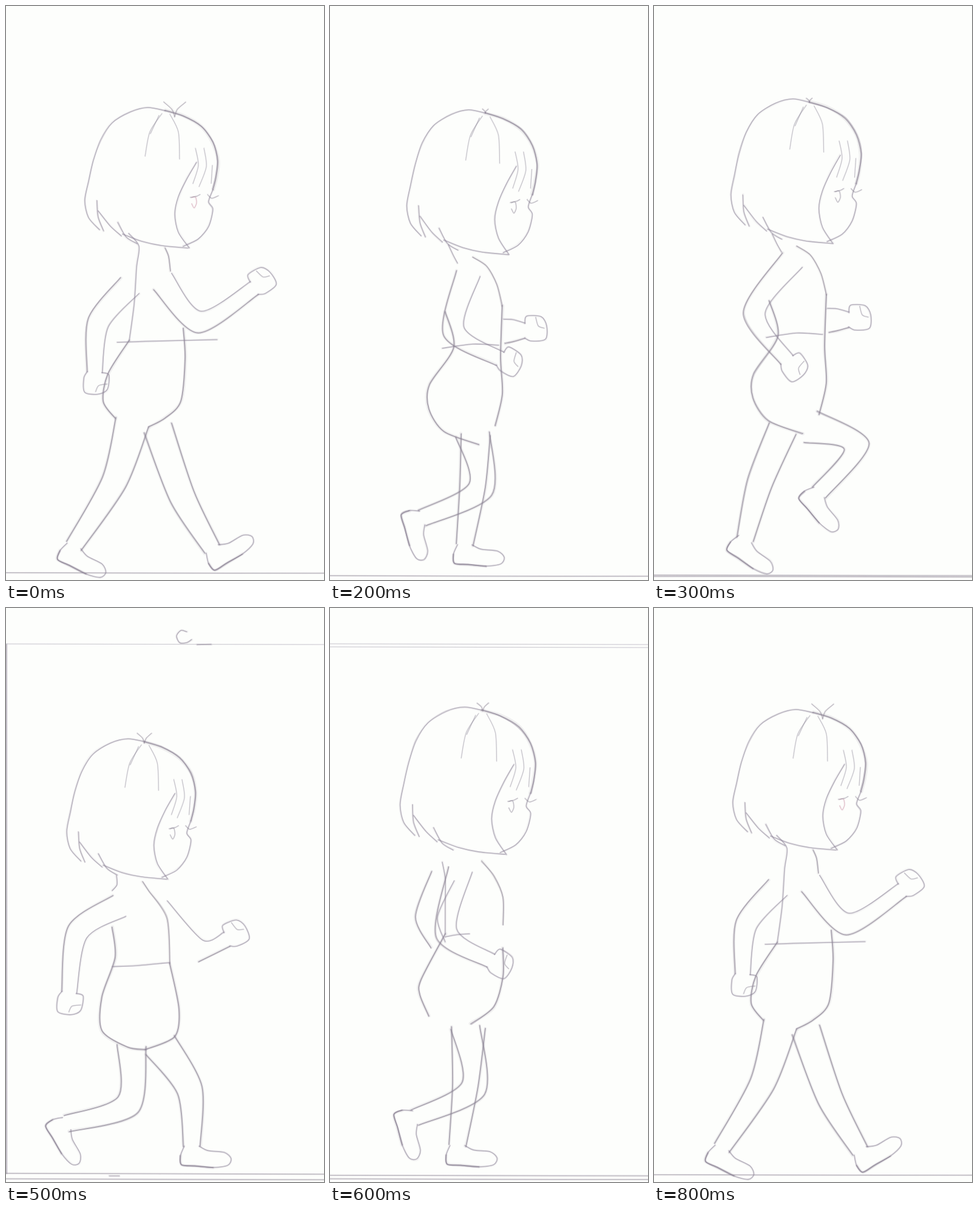
These frames come from a looping animation (524 by 944 pixels, 0.9 s). An HTML page:

```html
<!DOCTYPE html>
<html lang="en">
<head>
<meta charset="utf-8">
<title>Pencil walk cycle</title>
<style>
html,body{margin:0;width:100%;height:100%;overflow:hidden;background:#fdfefc}
svg{display:block;width:100vw;height:100vh}
path{fill:none;stroke:#8b8394;stroke-linecap:round;stroke-linejoin:round}
.pose{visibility:hidden;animation:single 900ms step-end infinite}
.pose.held{animation-name:double}
@keyframes single{0%{visibility:visible}11.1111%,100%{visibility:hidden}}
@keyframes double{0%{visibility:visible}22.2222%,100%{visibility:hidden}}
</style>
</head>
<body>
<svg id="stage" viewBox="0 0 524 944" preserveAspectRatio="none"></svg>
<script>
let seed = 7;
const jitter = size => {
  seed = seed * 16807 % 2147483647;
  return (seed / 2147483647 - .5) * size;
};

const pairs = xy => xy.flatMap((v, i) => i % 2 ? [] : [[v, xy[i + 1]]]);

// Smooth curve through the points, with a little hand wobble
function curve(points, wobble) {
  const p = points.map(q => q.map(v => v + jitter(wobble)));
  const at = i => p[Math.max(0, Math.min(p.length - 1, i))];
  const handle = (i, sign) => [0, 1].map(k => (at(i)[k] + sign * (at(i + 1)[k] - at(i - 1)[k]) / 7).toFixed(1));
  return p.slice(1).reduce((d, end, i) =>
    `${d}C${handle(i, 1)} ${handle(i + 1, -1)} ${end.map(v => v.toFixed(1))}`, 'M' + p[0]);
}

// A stroke is a firm line, a loose second line and a soft smudge.
function pencil(points, weight = 2, color = '') {
  const pass = (width, opacity, wobble) =>
    `<path d="${curve(points, wobble)}" stroke-width="${width}" opacity="${opacity}" style="stroke:${color}"/>`;
  return pass(.5 + .55 * weight, .22 + .13 * weight, 0)
    + pass(.4 + .45 * weight, .1 * weight, 1 + .6 * weight)
    + pass(2 * weight, .04 * weight, 1.5);
}
const line = (xy, weight) => pencil(pairs(xy), weight);

const place = (xy, x, y, angle = 0, sx = 1, sy = sx) => pairs(xy).map(([u, v]) => {
  const c = Math.cos(angle), s = Math.sin(angle);
  return [x + u * sx * c - v * sy * s, y + u * sx * s + v * sy * c];
});

// Head parts are measured from the crown.
const skull = [0,0, -28,-5, -57,2, -87,20, -106,48, -118,82, -126,116, -132,148, -126,176, -108,196];
const locks = [
  [-112,148, -110,175, -101,198], [-110,165, -90,190, -72,206], [-78,184, -64,208, -46,219],
  [-70,203, -38,215, -5,222, 38,226]
];
const fringe = [0,0, 30,9, 60,26, 79,52, 87,82, 84,110, 79,130];
const strands = [
  [-5,5, -25,35, -33,75], [-10,8, -24,38], [8,6, 22,35, 24,80],
  [50,62, 55,90, 46,120], [64,62, 68,92, 56,125], [78,90, 76,120]
];
const profile = [79,130, 72,150, 79,162, 72,190, 55,211, 30,223];
const cheek = [52,85, 36,112, 22,142, 16,170, 22,200, 40,226];
const iris = [44,143, 50,142, 52,152, 48,160, 44,153];
const lashes = [[42,143, 52,141, 58,138], [70,138, 77,144, 88,140]];

function drawHead({head: [x, y, sx, sy], tuft, eye}) {
  const draw = (xy, weight, color) => pencil(place(xy, x, y, 0, sx, sy), weight, color);
  const [tx, ty, size] = tuft;
  return draw(skull) + draw(fringe, 3) + draw(profile) + draw(cheek) + draw(iris, 1.5, eye)
    + locks.map(l => draw(l)).join('') + strands.map(l => draw(l, 1.3)).join('') + lashes.map(l => draw(l, 1.5)).join('')
    + [-1, 1].map(side => pencil(place([0,0, 3 * side,-8, 12 * side,-16], x + tx, y + ty, 0, size), 1.6)).join('');
}

// Two edges around a bent centre line, mitred at the joint
function limb(joints, widths) {
  const p = pairs(joints);
  const heading = i => Math.atan2(p[i + 1][1] - p[i][1], p[i + 1][0] - p[i][0]);
  const a = heading(0), b = heading(1);
  const bend = Math.atan2(Math.sin(a) + Math.sin(b), Math.cos(a) + Math.cos(b));
  const edge = side => p.map(([x, y], i) => {
    const r = side * widths[i] / 2, t = [a, bend, b][i];
    return [x + r * Math.sin(t), y - r * Math.cos(t)];
  });
  return {left: edge(1), right: edge(-1), heading: b, end: p[2]};
}

const fist = [0,-12, 3,-24, 27,-23, 36,-8, 34,14, 11,17, 0,12];
function drawArm(joints, {tucked = false, hand = 1} = {}) {
  const arm = limb(joints, [40, 36, 25]);
  const [x, y] = arm.end;
  return pencil(arm.left, 2) + pencil(arm.right.slice(tucked ? 1 : 0), 2.5)
    + (hand ? pencil(place(fist, x, y, arm.heading)) + pencil(place([18,-22, 22,-8, 32,-4], x, y, arm.heading), 1.5) : '');
}

const shoe = [-13,0, -20,17, -18,33, 6,35, 38,38, 64,34, 70,22, 58,11, 29,8, 13,0];
function drawLeg([...joints], thigh = 56) {
  const angle = joints.pop() * Math.PI / 180;
  const leg = limb(joints, [thigh, 42, 28]);
  const sole = place(shoe, ...leg.end, angle, .93);
  return pencil(leg.left, 2.6) + pencil(leg.right, 2.6) + pencil(sole) + pencil(sole.slice(1, 5), 2.5);
}

const contact = {
  head: [262, 172, 1, 1], tuft: [16, 10, 1.5], eye: '#c98fa2',
  neck: [202,374, 219,395, 215,430, 211,490, 203,550],
  back: [203,550, 168,605, 160,650, 180,678],
  throat: [262,398, 268,412, 271,436],
  belly: [292,530, 295,580, 288,650, 262,678, 235,692],
  waist: [183,553, 240,551, 348,549],
  near: [258,453, 319,520, 409,464], far: [204,460, 152,521, 146,602],
  nearLeg: [208,685, 178,783, 112,888, 22], farLeg: [250,694, 291,808, 340,893, -35],
  ground: [932]
};

const down = {
  head: [240, 227, 1, .97], tuft: [0, 2, 1.2],
  neck: [208,435, 208,462, 192,480, 189,530, 178,595],
  back: [178,595, 158,655, 167,690, 180,702],
  throat: [247,436, 252,455, 262,475],
  belly: [281,558, 283,620, 270,690, 235,716],
  waist: [160,578, 240,582, 283,585],
  near: [245,482, 322,560, 402,500], far: [195,497, 134,553, 118,627],
  nearLeg: [207,709, 174,812, 86,830, 92], farLeg: [255,715, 305,800, 285,903, 0],
  ground: [937]
};

const lift = {
  head: [256, 158, .98, 1.03], tuft: [0, 0, .4],
  neck: [195,375, 203,392, 210,405],
  back: [190,485, 204,543, 164,605, 163,645, 188,682, 245,703],
  throat: [235,395, 258,410, 275,440, 284,475],
  belly: [284,475, 281,560, 284,620, 272,672],
  waist: [185,545, 235,538, 278,540],
  near: [228,418, 165,505, 219,582], far: [287,517, 302,516, 321,516],
  nearLeg: [258,692, 334,724, 272,800, 45], farLeg: [212,695, 174,785, 150,877, 30],
  ground: [938, 936]
};

const downAgain = {
  head: [228, 220, .97, 1], tuft: [0, 2, 1],
  neck: [182,440, 183,455, 175,465],
  back: [175,525, 180,575, 158,640, 158,695, 200,722, 230,726],
  throat: [225,450, 235,465, 265,510, 270,585],
  belly: [270,585, 285,660, 278,705, 230,726],
  waist: [175,590, 215,588, 270,583],
  near: [187,490, 118,533, 104,632], far: [252,496, 321,564, 364,545], farStyle: {tucked: true},
  nearLeg: [254,719, 303,793, 306,885, 0], farLeg: [207,720, 201,817, 100,848, 55],
  ground: [930, 939], ceiling: [59],
  marks: [[298,39, 288,37, 281,46, 286,57, 298,57, 306,52], [315,60, 338,60], [1,60, 1,930], [170,934, 187,934]]
};

const liftAgain = {
  head: [250, 122, 1.02, 1.05], tuft: [2, 1, .8],
  neck: [185,372, 190,400, 190,440, 190,490],
  back: [190,490, 150,565, 148,590, 163,625],
  throat: [250,370, 270,395, 285,430, 285,475],
  belly: [285,513, 285,560, 270,610, 232,638],
  waist: [190,495, 210,491, 230,490],
  near: [212,378, 250,485, 338,499], far: [186,395, 159,462, 178,508], farStyle: {hand: 0},
  nearLeg: [198,632, 142,770, 114,859, 35], farLeg: [252,640, 322,715, 297,835, 8],
  ground: [933, 939], ceiling: [59, 64],
  marks: [[187,51, 268,51], [280,49, 285,38, 297,40], [362,140, 375,138], [7,320, 8,321]]
};

const passing = {
  ...lift, drop: 18, ground: [937],
  near: [228,422, 204,517, 280,562],
  nearLeg: [235,705, 248,795, 152,842, 70], farLeg: [240,705, 235,790, 222,886, 0]
};
const contactAgain = {
  ...contact, eye: '', ground: [935, 939],
  near: [230,455, 155,520, 150,605], far: contact.near
};
const passingAgain = {
  ...liftAgain, drop: 46, marks: [],
  near: [215,384, 192,489, 265,534],
  nearLeg: [228,690, 223,786, 210,884, 0], farLeg: [223,690, 236,790, 140,838, 70]
};

function drawPose(pose) {
  const {drop = 0, marks = [], ceiling = [], ground} = pose;
  const upper = drawHead(pose) + line(pose.neck, 2) + line(pose.back, 2.7) + line(pose.throat, 2.3)
    + line(pose.belly, 2.7) + line(pose.waist, 2) + drawArm(pose.near) + drawArm(pose.far, pose.farStyle);
  return `<g transform="translate(0 ${drop})">${upper}</g>`
    + drawLeg(pose.nearLeg) + drawLeg(pose.farLeg, 48)
    + ground.map(y => line([0, y, 250, y + .5, 524, y + 1], 1.8)).join('')
    + ceiling.map(y => line([0, y, 524, y + 1], 1)).join('')
    + marks.map(m => line(m, 2)).join('');
}

const cycle = [contact, down, passing, lift, contactAgain, downAgain, passingAgain, liftAgain];
document.getElementById('stage').innerHTML = cycle.map((pose, i) =>
  `<g class="pose${i ? '' : ' held'}" style="animation-delay:${i ? i * 100 - 900 : -100}ms">${drawPose(pose)}</g>`
).join('');
</script>
</body>
</html>
```
